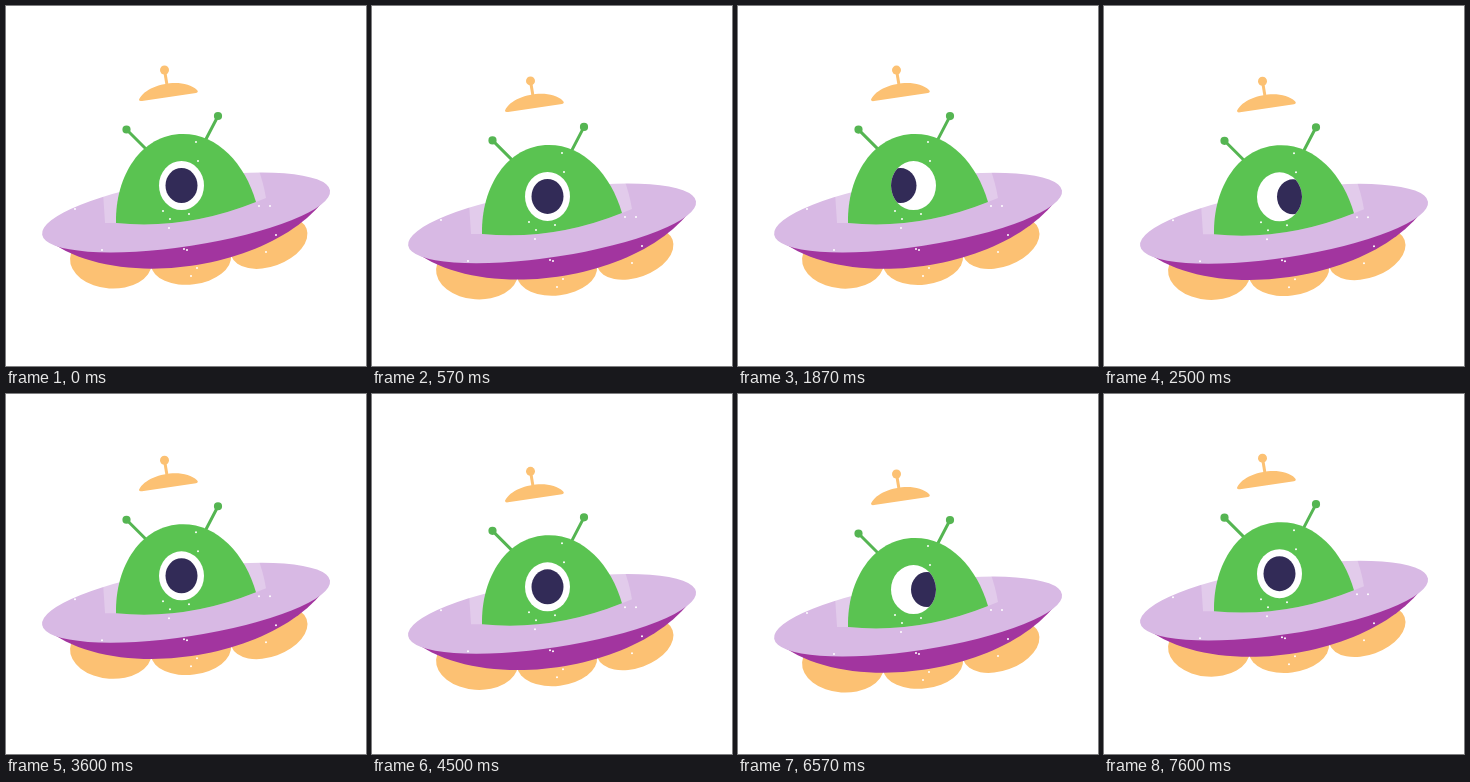
An HTML page for the animation above (7660 ms loop, 360 by 360 pixels).

```html
<!DOCTYPE html>
<html lang="en">
<head>
<meta charset="utf-8">
<title>Alien in a saucer</title>
<style>
  html, body { margin: 0; width: 100%; height: 100%; overflow: hidden; background: #fff; }
  svg { display: block; width: 100vw; height: 100vh; }
</style>
</head>
<body>
<svg viewBox="0 0 360 360">
  <clipPath id="eye"><ellipse cx="175.5" cy="179.5" rx="22.5" ry="24.5"/></clipPath>
  <g id="ship">
    <g fill="#fcc173">
      <ellipse cx="105" cy="255" rx="41" ry="27.5" transform="rotate(4 105 255)"/>
      <ellipse cx="185" cy="254.5" rx="40.3" ry="24" transform="rotate(-7 185 254.5)"/>
      <ellipse cx="263" cy="236.5" rx="40" ry="24" transform="rotate(-20 263 236.5)"/>
      <path d="M133 93.5C141 77 178 71 191 84Q193 86 190 87L136 95Q133 95.5 133 93.5"/>
      <circle cx="158.5" cy="64" r="4.5"/>
      <path d="M158.5 64L161 79" stroke="#fcc173" stroke-width="3"/>
    </g>
    <g transform="translate(180 206) rotate(-8.75)">
      <path d="M-144 3C-85 71 85 71 144 3Z" fill="#a2359f"/>
      <ellipse cy=".5" rx="145.6" ry="33.6" fill="#d8b9e4"/>
    </g>
    <path d="M99 217L97 187C97 150 118 110 136 96L190 88C225 105 254 150 260 192L250 196Q180 224 110 217Z" fill="#fff" opacity=".25"/>
    <g stroke="#55b552" stroke-width="3" fill="#55b552">
      <path d="M120.5 123.5L142 145M212 110L199 135"/>
      <circle cx="120.5" cy="123.5" r="2.6"/>
      <circle cx="212" cy="110" r="2.6"/>
    </g>
    <path d="M110 217C109 170 135 128 177 128C212 128 239 158 250 196Q180 224 110 217" fill="#5ac351"/>
    <ellipse cx="175.5" cy="179.5" rx="22.5" ry="24.5" fill="#fff"/>
    <g clip-path="url(#eye)">
      <ellipse id="pupil" cx="175.5" cy="179.5" rx="16" ry="17.5" fill="#322b57"/>
    </g>
    <!-- white specks -->
    <path stroke="#fff" stroke-width="2" stroke-linecap="round" d="M190 136h0M192 155h0M157 205h0M164 213h0M183 208h0M163 222h0M178 243h0M181 244h0M185 270h0M191 262h0M264 200h0M253 200h0M69 203h0M96 244h0M270 229h0M260 246h0"/>
  </g>
</svg>
<script>
  const LOOP = 7660, BOB = LOOP / 4, LOOK = LOOP / 2;
  const ship = document.getElementById("ship");
  const pupil = document.getElementById("pupil");

  const ramp = (x, a, b) => {
    const u = Math.min(1, Math.max(0, (x - a) / (b - a)));
    return u * u * (3 - 2 * u);
  };

  function draw(now) {
    const t = now % LOOP;
    const low = (1 - Math.cos(2 * Math.PI * t / BOB)) / 2;
    ship.setAttribute("transform", `translate(0 ${16.8 * low})`);

    // glance left, then right, then back to the middle
    const p = t % LOOK / LOOK;
    const look = -13 * ramp(p, .2, .28) + 26.5 * ramp(p, .5, .58) - 13.5 * ramp(p, .8, .88);
    pupil.setAttribute("cx", 175.5 + look);
  }

  const start = performance.now();
  (function frame() {
    draw(performance.now() - start);
    requestAnimationFrame(frame);
  })();
</script>
</body>
</html>
```
